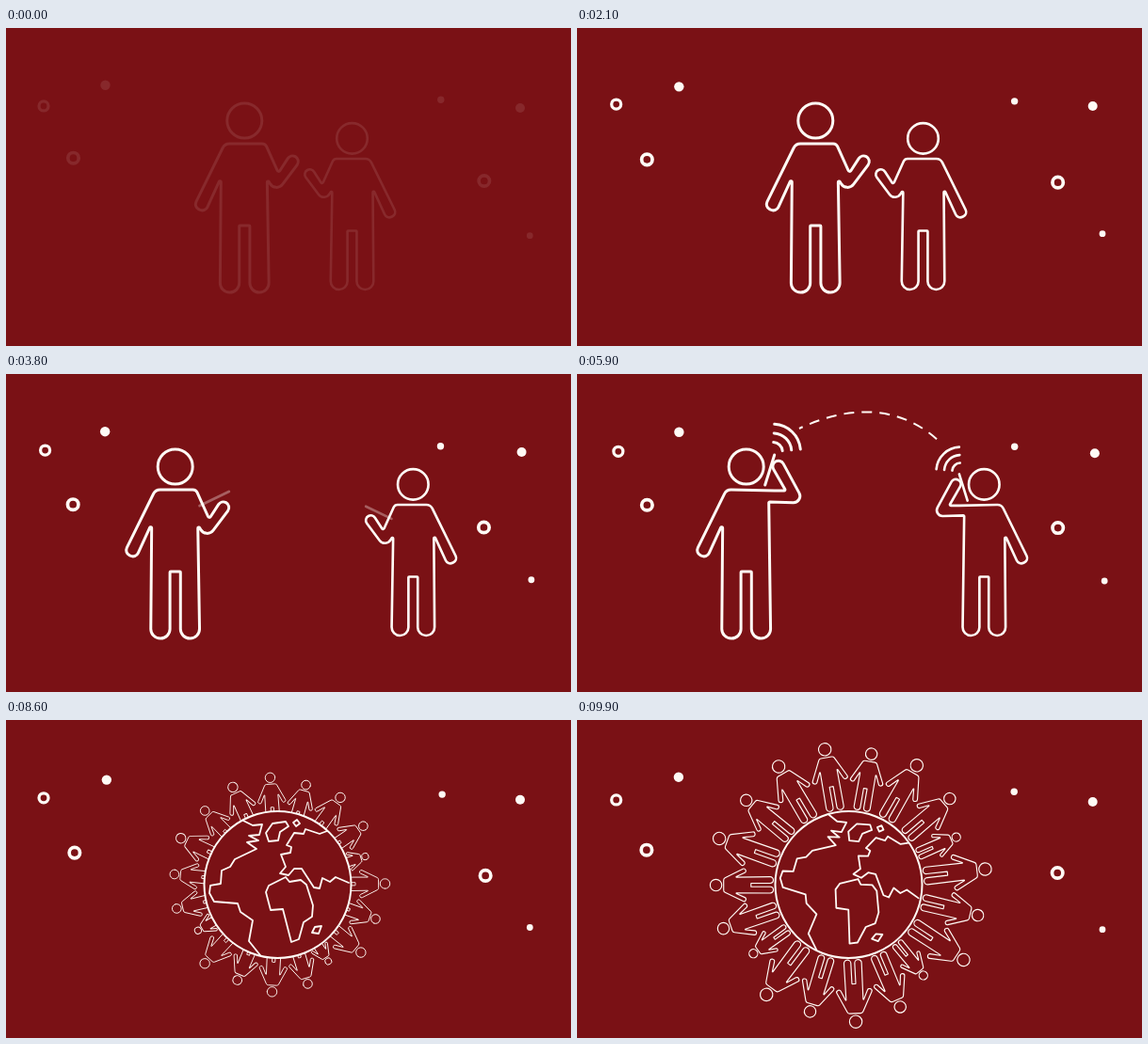
An HTML page with a canvas that plays this animation: 600 by 338 pixels, repeating every 10 s.

```html
<!DOCTYPE html>
<html lang="en">
<head>
<meta charset="utf-8">
<title>People connecting</title>
<style>
  html, body { margin: 0; width: 100%; height: 100%; overflow: hidden; background: #7a1115; }
  canvas { display: block; width: 600px; height: 338px; }
</style>
</head>
<body>
<canvas id="stage" width="600" height="338"></canvas>
<script>
const ctx = document.getElementById('stage').getContext('2d');
const LOOP = 10000, BG = '#7a1115', INK = '#fffaf5', TAU = Math.PI * 2, RAD = Math.PI / 180;

const clamp = x => Math.min(1, Math.max(0, x));
const ramp = (t, a, b) => clamp((t - a) / (b - a));
const ease = x => x < .5 ? 2 * x * x : 1 - 2 * (1 - x) ** 2;
const mix = (a, b, k) => a + (b - a) * k;
const mixPoints = (a, b, k) => a.map((p, i) => p.map((v, j) => mix(v, b[i][j], k)));
const mirror = pts => pts.map(([x, y, r]) => [-x, y, r]).reverse();

// Figure outline, x measured from the head's centre; each corner is [x, y, radius]
const leg = [[-5.6, 210, .8], [-5.6, 281, 10], [-26, 281, 10]];
const armLow = [[-25, 159, 1], [-42, 196, 6], [-54, 190, 6], [-21, 123, 8]];
const armBent = [[22, 123, 5], [36, 154, 1.5], [49, 134, 6], [60, 140, 6], [33, 176, 8], [24, 160, 1]];
const armRaised = [[30, 124, 2], [42, 124, 1], [26, 96, 6], [36.5, 90, 6], [62, 137, 7], [24, 136, 1]];
const phoneLow = [[26, 140], [57, 125]], phoneHigh = [[20, 118], [30, 86]];
const leftHalf = [...leg, ...armLow];
const plainFigure = [...leftHalf, ...mirror(leftHalf)];

// Ring of tall, medium and small figures; each takes room in proportion to its size
const sizes = { T: .361, M: .334, S: .246 };
const ring = [...'TMTMSTMTSMTMTSMMTMT'].map(c => sizes[c]);
const ringSize = ring.reduce((a, b) => a + b);

const globe = { x: 288.5, y: 175, r: 78 };
const land = new Path2D(
  'M252 107L262 112 272 111 269 122 258 123 268 128 256 130 266 137 243 148 238 156 229 160 228 174 217 176 ' +
  '216 184 221 193 246 195 249 204 262 213 258 235 270 250' +
  'M341 118L333 121 318 116 316 121 306 120 298 133 303 135 302 141 292 143 297 156 291 163 300 165 ' +
  '306 158 314 158 327 178 333 179 336 168 344 172 350 167 364 173' +
  'M276 183L279 176 297 167 301 172 313 170 319 175 326 197 325 209 316 215 311 233 303 236 294 201 281 202Z' +
  'M283 110L297 108 300 113 291 119 289 128 279 129 276 120Z' +
  'M305 109L309 106 312 110 308 113ZM325 226L328 220 335 219 332 227Z');
const callLine = new Path2D('M236 58C290 32 345 33 386 73');

// Two sets of drifting specks, each circling at its own rate
const rings = [[40, 83, 5], [72, 138, 5.7], [508.3, 162.3, 5.7]];
const dots = [[106, 60.5, 5.2], [462.3, 76, 3.7], [546, 85, 5], [556.3, 220.7, 3.4]];

function circle(x, y, r) {
  ctx.beginPath();
  ctx.arc(x, y, r, 0, TAU);
}

function line([a, b]) {
  ctx.beginPath();
  ctx.moveTo(...a);
  ctx.lineTo(...b);
  ctx.stroke();
}

function outline(pts) {
  const [x, y] = pts[0], [u, v] = pts[pts.length - 1];
  const seam = [(x + u) / 2, (y + v) / 2];
  ctx.beginPath();
  ctx.moveTo(...seam);
  pts.forEach(([px, py, r], i) => {
    const [nx, ny] = pts[i + 1] || seam;
    ctx.arcTo(px, py, nx, ny, r);
  });
  ctx.closePath();
  ctx.stroke();
}

function figure(pts) {
  circle(0, 98.5, 18.5);
  ctx.stroke();
  outline(pts);
}

function drift(x, y, t) {
  const outer = x < 50 || x > 520;
  const a = (outer ? 180 + .21 * t : 225 - .1 * t) * RAD;
  return outer
    ? [x + 2 + 2 * Math.cos(a), y + 2 * Math.sin(a)]
    : [x + .7 + 1.7 * Math.cos(a), y + 1.4 + 1.7 * Math.sin(a)];
}

function drawSpecks(t) {
  for (const [x, y, r] of rings) {
    circle(...drift(x, y, t), r);
    ctx.lineWidth = r * .65;
    ctx.stroke();
  }
  for (const [x, y, r] of dots) {
    circle(...drift(x, y, t), r);
    ctx.fill();
  }
}

function drawCaller(t, alpha, x, size, side) {
  const lift = ease(ramp(t, 3900, 4400));
  ctx.save();
  ctx.translate(x, 281 * (1 - size) - 25 * (1 - size));
  ctx.scale(side * size, size);
  ctx.lineWidth = 3;
  figure([...leftHalf, ...mixPoints(armBent, armRaised, lift), ...mirror(leg)]);

  ctx.globalAlpha = alpha * ramp(t, 3700, 4000);
  line(mixPoints(phoneLow, phoneHigh, lift));

  ctx.globalAlpha = alpha;
  const waves = t < 4400 ? 0 : Math.floor((t - 4400) % 800 / 200);
  for (let n = 0; n < waves; n++) {
    ctx.beginPath();
    ctx.arc(28.5, 82.5, 10 + n * 9.6, -87 * RAD, -5 * RAD);
    ctx.stroke();
  }
  ctx.restore();
}

function drawCall(t, alpha) {
  const apart = ease(ramp(t, 2300, 3400));
  ctx.globalAlpha = alpha;
  drawCaller(t, alpha, mix(253.3, 179.7, apart), 1, 1);
  drawCaller(t, alpha, mix(367.5, 432.3, apart), .88, -1);

  ctx.save();
  ctx.beginPath();
  ctx.rect(230, 30, 162 * ramp(t, 4600, 5500), 60);
  ctx.clip();
  ctx.lineWidth = 2;
  ctx.lineCap = 'butt';
  ctx.setLineDash([11, 8]);
  ctx.lineDashOffset = 7;
  ctx.stroke(callLine);
  ctx.restore();
}

function drawCrowd(t) {
  const grow = mix(.5, 1, ease(ramp(t, 8175, 8975)));
  let angle = -10 - 4.6 * (t - 9900) / 1000;
  ring.forEach((size, i) => {
    ctx.save();
    ctx.rotate(angle * RAD);
    ctx.scale(grow, grow);
    ctx.translate(0, -80);
    ctx.scale(size, size);
    ctx.translate(0, -281);
    ctx.lineWidth = 1.15 / size;
    figure(plainFigure);
    ctx.restore();
    angle += 180 * (size + ring[(i + 1) % ring.length]) / ringSize;
  });
}

function drawWorld(t, alpha) {
  ctx.save();
  ctx.globalAlpha = alpha;
  ctx.translate(globe.x, globe.y);
  if (t > 8175) drawCrowd(t);

  circle(0, 0, globe.r);
  ctx.fillStyle = BG;
  ctx.fill();
  ctx.lineWidth = 2;
  ctx.stroke();
  ctx.rotate(9.6 * (t - 8600) / 1000 * RAD);
  ctx.translate(-globe.x, -globe.y);
  ctx.lineWidth = 1.8;
  ctx.stroke(land);
  ctx.restore();
}

function draw(t) {
  ctx.globalAlpha = 1;
  ctx.fillStyle = BG;
  ctx.fillRect(0, 0, 600, 338);
  ctx.fillStyle = ctx.strokeStyle = INK;
  ctx.lineCap = ctx.lineJoin = 'round';

  const intro = mix(.1, 1, ramp(t, 0, 700));
  ctx.globalAlpha = intro;
  drawSpecks(t);
  if (t < 7700) drawCall(t, intro * (1 - ramp(t, 7400, 7700)));
  else drawWorld(t, ramp(t, 7700, 8050));
}

const start = performance.now();
function tick() {
  draw((performance.now() - start) % LOOP);
  requestAnimationFrame(tick);
}
tick();
</script>
</body>
</html>
```
